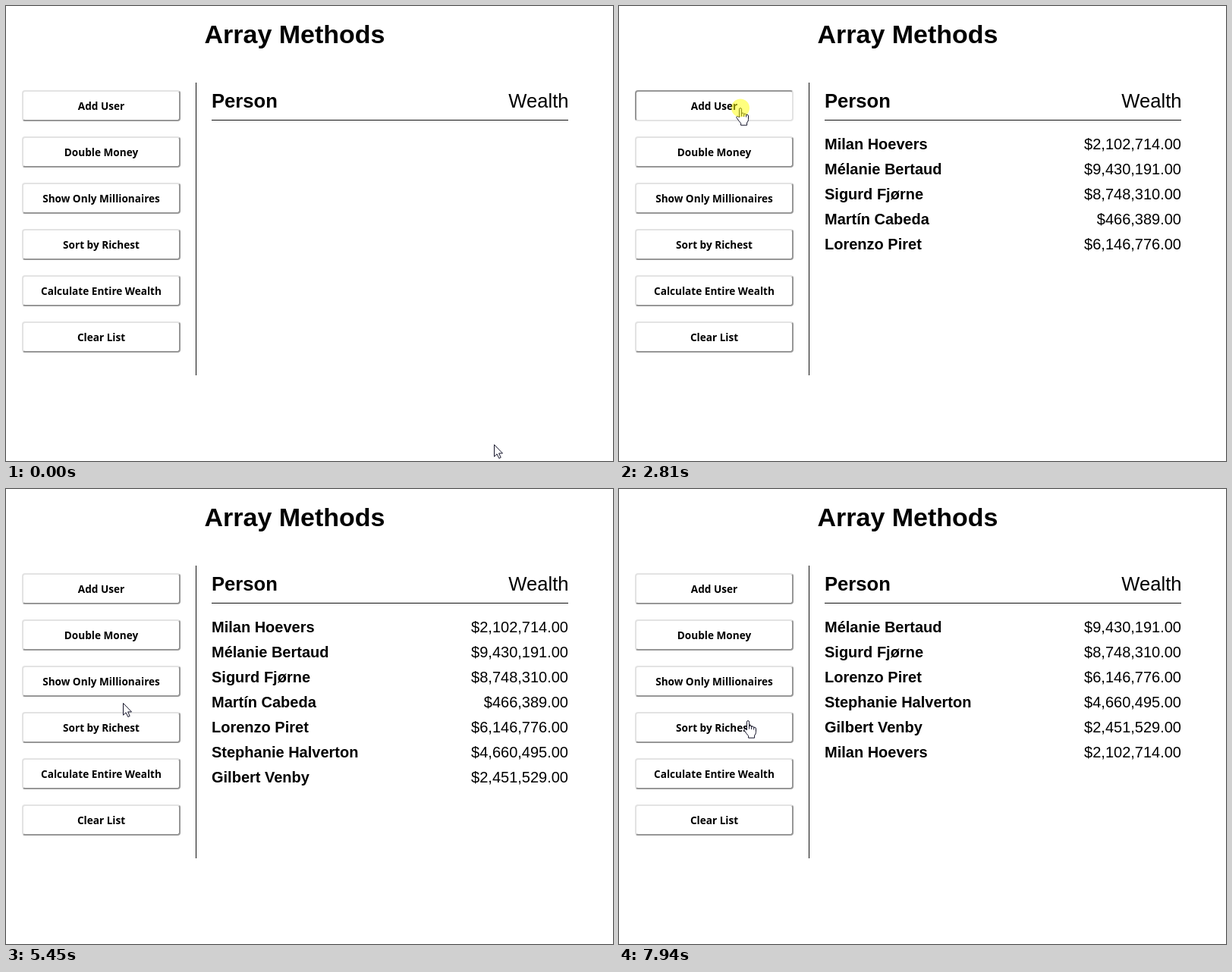
Write an HTML page that moves like this. It is 800 px wide and 600 px high and loops after 8000 ms.

```html
<!DOCTYPE html>
<html lang="en">
<head>
<meta charset="utf-8">
<title>Array Methods</title>
<style>
html, body { margin: 0; width: 100%; height: 100%; overflow: hidden; background: #fff; }
.button {
  position: absolute; left: 21px; width: 209px; height: 41px; box-sizing: border-box;
  border: 2px solid; border-color: #e3e3e3 #979797 #979797 #e3e3e3; border-radius: 4px;
  font: bold 13.6px/37px "Noto Sans", sans-serif; text-align: center; white-space: nowrap;
}
.button.pressed { border-color: #979797 #e3e3e3 #e3e3e3 #979797; }
svg { position: absolute; left: 0; top: 0; }
text { font-family: "Liberation Sans", Arial, sans-serif; }
.row { font-size: 20px; }
.head { font-size: 25.6px; }
.bold { font-weight: bold; }
.end { text-anchor: end; }
.pointer { fill: #fff; stroke: #14142a; stroke-linejoin: round; }
</style>
</head>
<body>
<svg width="800" height="600" viewBox="0 0 800 600">
  <text class="bold" x="380.5" y="49" font-size="34" text-anchor="middle">Array Methods</text>
  <text class="head bold" x="271" y="134">Person</text>
  <text class="head end" x="741.5" y="134">Wealth</text>
  <path d="M250 101h1v386h-1zM271 150h470v1h-470z" fill="#111"/>
  <g id="rows"></g>
  <g id="cursor">
    <path id="arrow" class="pointer" d="M.5 .5V16.2L4.1 12.8 6.8 18.5 9.2 17.4 6.6 11.9H11.5Z"/>
    <g id="hand" class="pointer" transform="translate(-6 0)">
      <path d="M4.5 2.2Q4.5 .6 6 .6T7.6 2.2V7.4Q10 6.5 10.7 8.2 13 7.4 13.7 9.2 16.5 8.8 16.5 11V15.5Q16.5 18 14.6 20V23.2H6.6V20.5Q4.6 18.6 1.2 13.6 .3 11.8 1.8 11.3 3 11 4.5 13Z"/>
      <path d="M7.6 7V11.5M10.7 8V12M13.7 9V12.5" fill="none"/>
    </g>
    <circle id="glow" cy=".5" r="12" fill="#ff0" fill-opacity=".5"/>
  </g>
</svg>
<script>
const LOOP = 8000, STEP = 77.5;     // the pointer is redrawn once per STEP
const HOLD = 120, ADD_DELAY = 130;  // button held down; wait for a new user
const FILTER_AT = 6240, SORT_AT = 7480;
const labels = ['Add User', 'Double Money', 'Show Only Millionaires',
  'Sort by Richest', 'Calculate Entire Wealth', 'Clear List'];
const people = [
  { name: 'Milan Hoevers', wealth: 2102714, added: 930 },
  { name: 'Mélanie Bertaud', wealth: 9430191, added: 1410 },
  { name: 'Sigurd Fjørne', wealth: 8748310, added: 1720 },
  { name: 'Martín Cabeda', wealth: 466389, added: 2110 },
  { name: 'Lorenzo Piret', wealth: 6146776, added: 2580 },
  { name: 'Stephanie Halverton', wealth: 4660495, added: 3040 },
  { name: 'Gilbert Venby', wealth: 2451529, added: 3820 }
];
const clicks = [
  ...people.map(p => ({ label: 'Add User', release: p.added - ADD_DELAY })),
  { label: 'Show Only Millionaires', release: FILTER_AT },
  { label: 'Sort by Richest', release: SORT_AT }
];
const trips = [
  { start: 2, end: 700, x: 160, y: 134 },
  { start: 3740, end: 4440, x: 169, y: 320, bend: -20 },
  { start: 4440, end: 4595, x: 193, y: 369 },
  { start: 4595, end: 4750, x: 154, y: 367 },
  { start: 5140, end: 5600, x: 154, y: 254 },
  { start: 6450, end: 7010, x: 170, y: 305, bend: 15 }
];
const $ = id => document.getElementById(id);
const show = (el, on) => el.setAttribute('visibility', on ? 'visible' : 'hidden');
const moveTo = (el, x, y) => el.setAttribute('transform', `translate(${x} ${y})`);
const buttonTop = i => 111 + 61 * i;

const buttons = labels.map((label, i) => {
  const el = document.createElement('div');
  el.className = 'button';
  el.style.top = buttonTop(i) + 'px';
  el.textContent = label;
  document.body.insertBefore(el, document.querySelector('svg'));
  return el;
});

$('rows').innerHTML = people.map(({ name, wealth }) =>
  `<g class="row"><text class="bold" x="271">${name}</text>` +
  `<text class="end" x="741">$${wealth.toLocaleString('en-US')}.00</text></g>`).join('');
people.forEach((p, i) => p.el = $('rows').children[i]);

function cursorAt(t) {
  let x = 643, y = 578;
  for (const trip of trips) {
    if (t < trip.start) break;
    const elapsed = Math.floor((t - trip.start) / STEP) * STEP;
    const p = Math.min(1, elapsed / (trip.end - trip.start));
    const eased = p - Math.sin(2 * Math.PI * p) / 12;
    x += (trip.x - x) * eased + (trip.bend || 0) * Math.sin(Math.PI * p);
    y += (trip.y - y) * eased;
  }
  return [Math.round(x), Math.round(y)];
}

function listAt(t) {
  let list = people.filter(p => t >= p.added);
  if (t >= FILTER_AT) list = list.filter(p => p.wealth >= 1e6);
  if (t >= SORT_AT) list.sort((a, b) => b.wealth - a.wealth);
  return list;
}

function render(t) {
  const list = listAt(t);
  for (const p of people) {
    const place = list.indexOf(p);
    show(p.el, place >= 0);
    moveTo(p.el, 0, 189 + 33 * place);
  }

  const click = clicks.find(c => t >= c.release - HOLD && t < c.release);
  buttons.forEach((el, i) =>
    el.classList.toggle('pressed', Boolean(click) && click.label === labels[i]));

  const [x, y] = cursorAt(t);
  const over = x >= 21 && x < 230 &&
    labels.some((_, i) => y >= buttonTop(i) && y < buttonTop(i) + 41);
  moveTo($('cursor'), x, y);
  show($('arrow'), !over);
  show($('hand'), over);
  show($('glow'), click);
}

function tick() {
  render(performance.now() % LOOP);
  requestAnimationFrame(tick);
}
tick();
</script>
</body>
</html>
```
